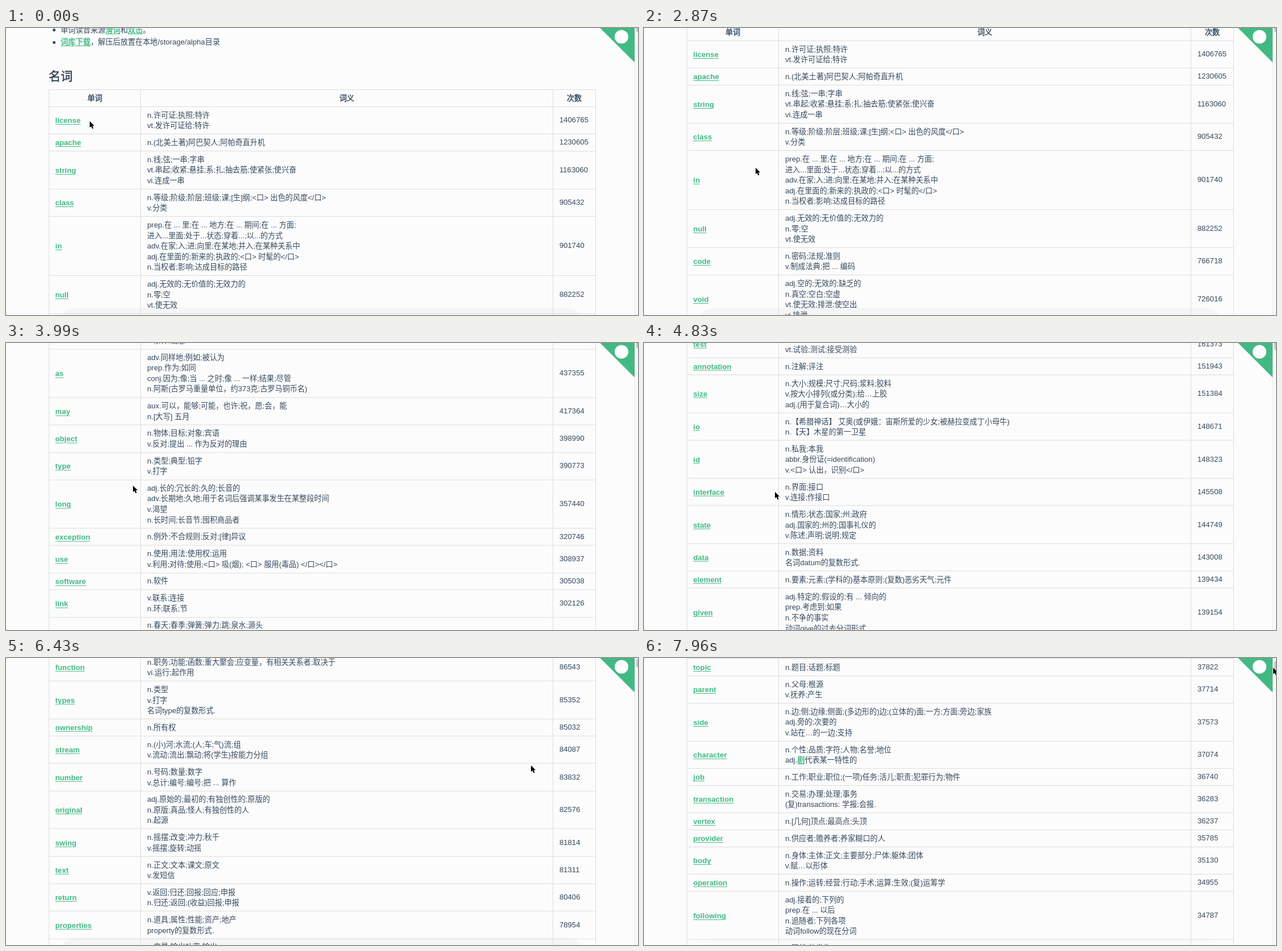
Recreate the animation shown at these times as an HTML page. Size 1110 by 505 pixels, loop 8 s.

```html
<!DOCTYPE html>
<html lang="zh-CN">
<head>
<meta charset="utf-8">
<title>名词</title>
<style>
html, body { margin: 0; width: 100%; height: 100%; overflow: hidden; background: #fcfcfc; }
body {
  position: relative; color: #34495e;
  font: 13.125px/18.53px "Liberation Sans", "Noto Sans CJK SC", "Noto Sans CJK", sans-serif;
}
#shade {
  position: absolute; left: 100px; top: 491.5px; width: 908px; height: 14px;
  background: #f5f5f5; border-radius: 32px 32px 0 0 / 14px 14px 0 0;
}
#page { position: absolute; inset: 0; }
#page > * { position: absolute; margin: 0; white-space: pre; }
b { color: #42b983; text-decoration: underline 1px; text-underline-offset: 2px; }
.item { left: 96px; }
.item::before {
  content: ""; position: absolute; left: -14.5px; top: 6.5px;
  width: 5px; height: 5px; border-radius: 50%; background: #34495e;
}
/* Semibold Chinese: a regular face with a thin outline. */
h2, .head, .item b { font-weight: 400; -webkit-text-stroke: 0.45px; }
h2 { left: 75px; top: 70px; font-size: 21px; line-height: 30px; color: #2c3e50; }
.row {
  left: 75px; width: 961px; box-sizing: border-box;
  display: grid; grid-template-columns: 160px 724px 75px;
  border: solid #ddd; border-width: 1px 1px 0;
}
.row > div { display: flex; align-items: center; padding-left: 11px; border-left: 1px solid #ddd; }
.row > div:first-child { padding: 2px 0 0 10.5px; border: 0; }
.row > div:nth-child(2) { padding-top: 1.5px; }
.row.head > div { justify-content: center; padding: 2px 0 0; }
#ribbon { position: absolute; left: 0; top: 0; }
#bar {
  position: absolute; left: 1104px; top: 0; width: 6px; height: 505px; overflow: hidden;
  box-sizing: border-box; border-left: 1px solid #e8e8e8; background: #fafafa;
}
#thumb { position: absolute; left: 2px; width: 8px; height: 16px; border-radius: 4px; background: #c4c4c4; }
#cursor { position: absolute; left: -2px; top: -2px; }
</style>
</head>
<body>
<div id="shade"></div>
<div id="page">
  <div class="item" style="top:-5.5px">单词读音来源<b>滑词</b>和<b>双击</b>。</div>
  <div class="item" style="top:16px"><b>词库下载</b>，解压后放置在本地/storage/alpha目录</div>
  <h2>名词</h2>
  <div class="row head" style="top:108px;height:30px"><div>单词</div><div>词义</div><div>次数</div></div>
</div>
<svg id="ribbon" width="1110" height="70">
  <path d="M1043.5 0H1104V60.5Z" fill="#42b983"/><circle cx="1081" cy="15.5" r="12" fill="#fff"/>
</svg>
<div id="bar"><div id="thumb"></div></div>
<svg id="cursor" width="16" height="22">
  <path transform="translate(2 2) scale(.86)" d="M0 0V13.2L3 10.4L5.2 15.5L7.7 14.5L5.5 9.5H9.6Z" stroke="#fff" stroke-width="1" paint-order="stroke"/>
</svg>
<script>
// One entry per line: word, count (optional), meanings separated by "|".
const entries = `
license 1406765 n.许可证;执照;特许|vt.发许可证给;特许
apache 1230605 n.(北美土著)阿巴契人;阿帕奇直升机
string 1163060 n.线;弦;一串;字串|vt.串起;收紧;悬挂;系;扎;抽去筋;使紧张;使兴奋|vi.连成一串
class 905432 n.等级;阶级;阶层;班级;课;[生]纲;<口> 出色的风度</口>|v.分类
in 901740 prep.在 ... 里;在 ... 地方;在 ... 期间;在 ... 方面;|进入...里面;处于...状态;穿着...;以...的方式|adv.在家;入;进;向里;在某地;并入;在某种关系中|adj.在里面的;新来的;执政的;<口> 时髦的</口>|n.当权者;影响;达成目标的路径
null 882252 adj.无效的;无价值的;无效力的|n.零;空|vt.使无效
code 766718 n.密码;法规;准则|v.制成法典;把 ... 编码
void 726016 adj.空的;无效的;缺乏的|n.真空;空白;空虚|vt.使无效;排泄;使空出|vi.排泄
name n.名字;名声;名人|v.命名;提名;列举|adj.有名的
value n.价值;价格;数值|vt.评价;重视;估价
file n.文件;档案;锉刀|v.归档;提出;锉
version n.版本;译文;说法
get v.得到;获得;变成;到达|n.幼兽
list n.名单;目录;清单|v.列举;列于表上
key n.钥匙;关键;键|adj.关键的;主要的|v.键入;调节
method n.方法;办法;条理
see v.看见;理解;领会;考虑|n.主教教区
if conj.如果;是否;即使|n.条件;设想
as 437355 adv.同样地;例如;被认为|prep.作为;如同|conj.因为;像;当 ... 之时;像 ... 一样;结果;尽管|n.阿斯(古罗马重量单位，约373克;古罗马铜币名)
may 417364 aux.可以，能够;可能，也许;祝，愿;会，能|n.[大写] 五月
object 398990 n.物体;目标;对象;宾语|v.反对;提出 ... 作为反对的理由
type 390773 n.类型;典型;铅字|v.打字
long 357440 adj.长的;冗长的;久的;长音的|adv.长期地;久地;用于名词后强调某事发生在某整段时间|v.渴望|n.长时间;长音节;囤积商品者
exception 320746 n.例外;不合规则;反对;[律]异议
use 308937 n.使用;用法;使用权;运用|v.利用;对待;使用;<口> 吸(烟); <口> 服用(毒品) </口></口>
software 305038 n.软件
link 302126 v.联系;连接|n.环;联系;节
spring n.春天;春季;弹簧;弹力;跳;泉水;源头|v.跳;弹起;涌出|adj.春天的
param n.参数
set n.一套;布景;集合|v.放置;设定;确定|adj.固定的;规定的
error n.错误;过失;误差
index n.索引;指数;指标|v.编入索引中
result n.结果;成绩;答案|vi.产生;致使
map n.地图;映射|v.绘制地图;计划
context n.上下文;环境;背景
path n.小路;路线;轨道
default n.默认值;违约;缺席|v.不履行;拖欠
copyright n.版权;著作权|adj.版权的|vt.取得版权
override v.推翻;不顾;优先于|n.代理佣金
model n.模型;模范;模特儿|v.做模型;塑造
request n.要求;请求|vt.请求;要求
final adj.最终的;决定性的|n.决赛;期末考试
time n.时间;时代;次数|v.计时;选择时机
source n.来源;水源;原始资料
node n.节点;结点;瘤
message n.消息;信息;要旨|v.通知
field n.田野;领域;字段|v.接球;派出场|adj.田间的
test 161373 n.试验;测试;考验|vt.试验;测试;接受测验
annotation 151943 n.注解;评注
size 151384 n.大小;规模;尺寸;尺码;浆料;胶料|v.按大小排列(或分类);给…上胶|adj.(用于复合词)…大小的
io 148671 n.【希腊神话】 艾奥(或伊娥：宙斯所爱的少女;被赫拉变成丁小母牛)|n.【天】木星的第一卫星
id 148323 n.私我;本我|abbr.身份证(=identification)|v.<口> 认出，识别</口>
interface 145508 n.界面;接口|v.连接;作接口
state 144749 n.情形;状态;国家;州;政府|adj.国家的;州的;国事礼仪的|v.陈述;声明;说明;规定
data 143008 n.数据;资料|名词datum的复数形式.
element 139434 n.要素;元素;(学科的)基本原则;(复数)恶劣天气;元件
given 139154 adj.特定的;假设的;有 ... 倾向的|prep.考虑到;如果|n.不争的事实|动词give的过去分词形式.
user n.用户;使用者
event n.事件;大事;比赛项目
group n.组;团体|v.聚合;分组
array n.数组;排列;大批|vt.排列;部署
length n.长度;期间
service n.服务;公职;检修|v.维护;检修|adj.服务性的
format n.格式;版式|v.格式化
current adj.现在的;通用的|n.水流;电流;趋势
start v.开始;出发;启动|n.开始;起点
end n.末端;结局;目的|v.结束;终止
column n.圆柱;专栏;列
point n.点;要点;分数|v.指向;瞄准
component n.成分;零件|adj.组成的
buffer n.缓冲区;缓冲器|v.缓冲
read v.阅读;读懂|n.读物
instance n.例子;实例;情况|v.举例
server n.服务器;侍者
response n.回答;响应;反应
table n.桌子;表格|v.搁置;列表|adj.桌子的
order n.命令;顺序;订单|v.命令;订购;整理
color n.颜色;肤色;颜料|v.着色;脸红
client n.客户;委托人
image n.图像;肖像;印象|v.想像;反映
session n.会议;会话;学期
write v.写;写作;写信
process n.过程;程序;步骤|v.加工;处理
action n.行动;活动;诉讼
thread n.线;线索;线程|v.穿过;穿线于
token n.记号;代币;纪念品|adj.象征的
entry n.进入;入口;条目
function 86543 n.职务;功能;函数;重大聚会;应变量，有相关关系者;取决于|vi.运行;起作用
types 85352 n.类型|v.打字|名词type的复数形式.
ownership 85032 n.所有权
stream 84087 n.(小)河;水流;(人;车;气)流;组|v.流动;流出;飘动;将(学生)按能力分组
number 83832 n.号码;数量;数字|v.总计;编号;编号;把 ... 算作
original 82576 adj.原始的;最初的;有独创性的;原版的|n.原版;真品;怪人;有独创性的人|n.起源
swing 81814 n.摇摆;改变;冲力;秋千|v.摇摆;旋转;动摇
text 81311 n.正文;文本;课文;原文|v.发短信
return 80406 v.返回;归还;回报;回应;申报|n.归还;返回;(收益)回报;申报
properties 78954 n.道具;属性;性能;资产;地产|property的复数形式.
output n.产量;输出功率;输出|vt.输出;生产
input n.输入;投入|v.输入
content n.内容;目录;满足|adj.满意的|vt.使满足
target n.目标;靶子|v.把 ... 作为目标
filter n.过滤器;滤光器|v.过滤;渗透
query n.疑问;查询|v.询问;质疑
row n.排;行;划船|v.划船
resource n.资源;办法;机智
label n.标签;商标|vt.贴标签于;分类
limit n.限制;界限|v.限制;限定
cache n.贮藏处;缓存|v.隐藏;贮藏
scope n.范围;余地;视野
button n.按钮;纽扣|v.扣住
document n.文件;文献|v.证明;记载
record n.记录;唱片;履历|v.记录;录音|adj.创纪录的
block n.块;街区;障碍物|v.阻塞;封锁
position n.位置;职位;立场|v.安置;定位
module n.模块;组件;单元
root n.根;根源|v.生根;扎根
schema n.概要;图解;模式
handler n.处理者;训练者
task n.任务;作业|v.分派任务
layout n.布局;安排;设计
cell n.细胞;单元;小房间
address n.地址;演讲|v.致辞;写地址
security n.安全;保证;证券|adj.安全的
match n.比赛;火柴;对手|v.匹配;相配
builder n.建筑者;建立者
window n.窗;窗口
factory n.工厂;制造厂
package n.包裹;套装软件|v.包装
template n.模板;样板
child n.孩子;子女
frame n.框架;帧;结构|v.构成;设计;陷害
graph n.图表;曲线图|vt.用图表示
language n.语言;措辞
header n.页眉;标题;头球
plugin n.插件
queue n.队列;长队|v.排队
role n.角色;任务
channel n.频道;海峡;渠道|v.引导;开导
topic 37822 n.题目;话题;标题
parent 37714 n.父母;根源|v.抚养;产生
side 37573 n.边;侧;边缘;侧面;(多边形的)边;(立体的)面;一方;方面;旁边;家族|adj.旁的;次要的|v.站在…的一边;支持
character 37074 n.个性;品质;字符;人物;名誉;地位|adj.*剧*代表某一特性的
job 36740 n.工作;职业;职位;(一项)任务;活儿;职责;犯罪行为;物件
transaction 36283 n.交易;办理;处理;事务|(复)transactions: 学报;会报.
vertex 36237 n.[几何]顶点;最高点;头顶
provider 35785 n.供应者;赡养者;养家糊口的人
body 35130 n.身体;主体;正文;主要部分;尸体;躯体;团体|v.赋…以形体
operation 34955 n.操作;运转;经营;行动;手术;运算;生效;(复)运筹学
following 34787 adj.接着的;下列的|prep.在 ... 以后|n.追随者;下列各项|动词follow的现在分词
failure 34702 n.现状;的发生|n.失败`.trim().split('\n').map(line => {
  const [, word, count, text] = line.match(/^(\S+) (?:(\d+) )?(.*)$/);
  return { word, count: +count, lines: text.split('|') };
});

const $ = id => document.getElementById(id);

// Missing counts fall evenly between their known neighbours.
entries.forEach((entry, i) => {
  if (entry.count) return;
  const steps = entries.slice(i).findIndex(e => e.count);
  const last = entries[i - 1].count;
  entry.count = Math.round(last * (entries[i + steps].count / last) ** (1 / (steps + 1)));
});

const markup = s => s.replace(/</g, '&lt;').replace(/\*(.)\*/g, '<b>$1</b>');
const tops = {};
let bottom = 138, rows = '';
for (const { word, count, lines } of entries) {
  const height = 11.25 + 18.53 * lines.length;
  tops[word] = bottom;
  rows += `<div class="row" style="top:${bottom}px;height:${height}px"><div><b>${word}</b></div>` +
    `<div><span>${markup(lines.join('\n'))}</span></div><div>${count}</div></div>`;
  bottom += height;
}
$('page').insertAdjacentHTML('beforeend', rows);

const refreshes = [
  [0, 0, 1], [600, 1510, 7], [1690, 1690, 1], [2130, 2420, 3], [2870, 3010, 2],
  [3170, 3810, 5], [3990, 3990, 1], [4170, 4830, 5], [4980, 4980, 1],
  [5150, 6140, 7], [6290, 6430, 2], [6640, 7180, 4], [7360, 7960, 5]
].flatMap(([a, b, n]) => Array.from({ length: n }, (_, i) => a + (b - a) * i / Math.max(1, n - 1)));

const scrollKeys = [
  [0, 0], [450, 0], [1510, 32], [1980, 32], [2420, 92], [2870, 116],
  [3990, tops.may - 95.6], [4830, tops.annotation - 25.6],
  [6430, tops.types - 40], [7180, tops.parent - 30.6]
];
const cursorKeys = [
  [0, 147, 164], [450, 147, 164], [1510, 311, 231], [1690, 159, 204], [1980, 159, 204],
  [2870, 196, 246], [3990, 223, 251], [4830, 230, 262], [5800, 236, 262],
  [6430, 922, 189], [7180, 1077, 50], [7960, 1105, 17]
];
const shadeKeys = [[0, 1], [750, 0], [2420, 1], [3170, 0], [6290, 1], [6640, 0], [7180, 0.35]];

function tween(keys, t) {
  const next = keys.findIndex(k => k[0] > t);
  if (next < 0) return keys.at(-1).slice(1);
  const [from, to] = [keys[next - 1], keys[next]];
  const p = (t - from[0]) / (to[0] - from[0]);
  return from.slice(1).map((v, i) => v + (to[i + 1] - v) * p);
}

function draw(now) {
  const t = refreshes.findLast(r => r <= now % 8000);
  const [scroll] = tween(scrollKeys, t);
  const [x, y] = tween(cursorKeys, t);
  $('page').style.transform = `translateY(${-scroll}px)`;
  $('cursor').style.transform = `translate(${x}px, ${y}px)`;
  $('thumb').style.top = -8 + 13 * scroll / scrollKeys.at(-1)[1] + 'px';
  $('shade').style.opacity = shadeKeys.findLast(k => k[0] <= t)[1];
}

const start = performance.now();
(function loop() {
  draw(performance.now() - start);
  requestAnimationFrame(loop);
})();
</script>
</body>
</html>
```
